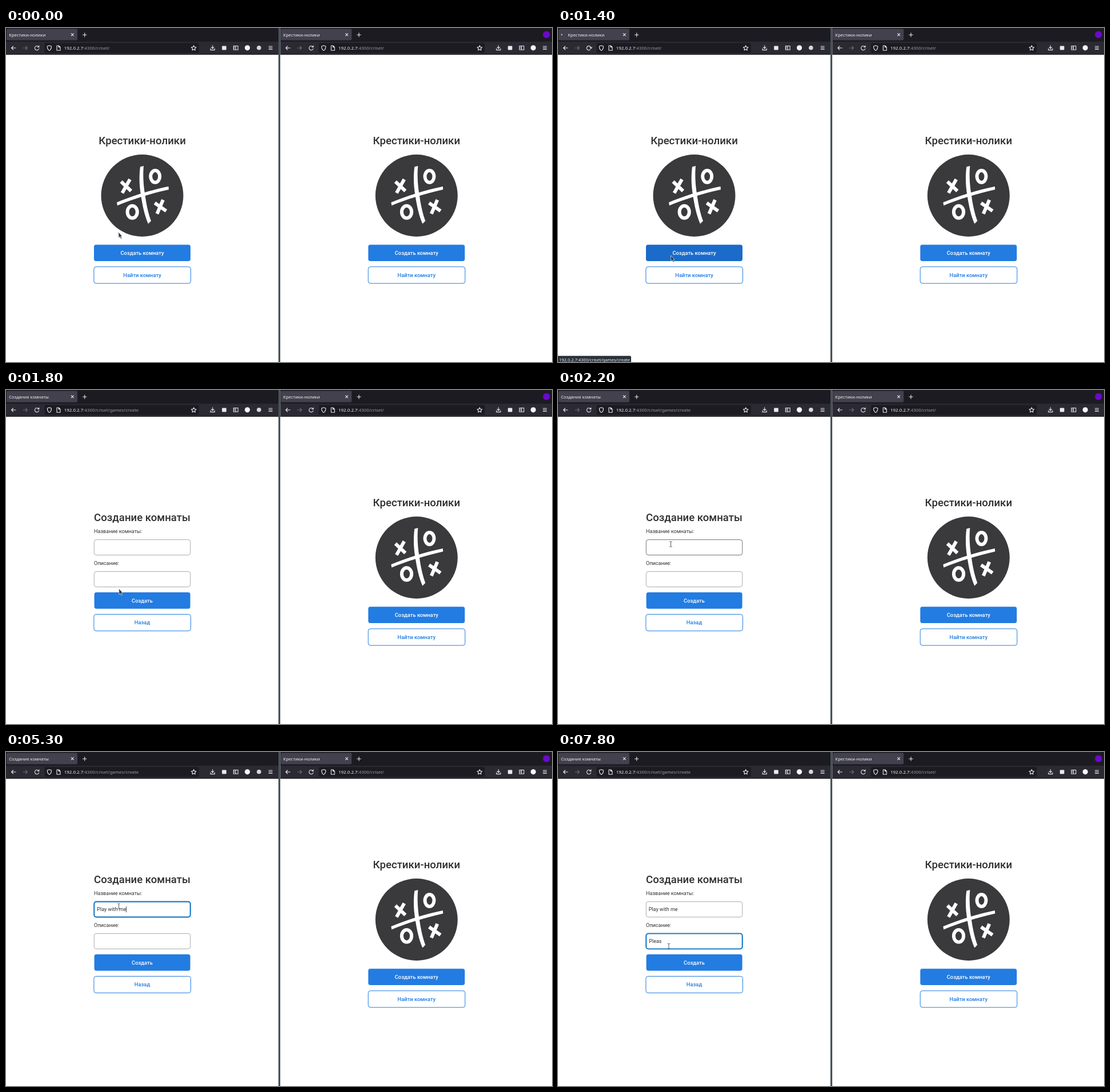
Write an HTML page that moves like this. It is 956x586 px and loops after 8 s.

```html
<!DOCTYPE html>
<html lang="ru">
<head>
<meta charset="utf-8">
<title>Крестики-нолики</title>
<style>
html, body { margin: 0; width: 100%; height: 100%; overflow: hidden; background: #fff; }
svg { display: block; width: 100%; height: 100%; }
text { white-space: pre; }
.ui { font-family: "Noto Sans", sans-serif; font-size: 7.5px; fill: #f3f3f6; }
.url { font-size: 7.9px; }
.dim { fill: #9c9ba5; }
.icon { fill: none; stroke: #e9e9ee; stroke-width: 1.1; stroke-linecap: round; stroke-linejoin: round; }
.h1, .btn { font-family: Roboto, sans-serif; font-weight: 500; text-anchor: middle; }
.h1 { font-size: 18.6px; fill: #303030; }
.btn { font-size: 9.4px; }
.body { font-family: Roboto, sans-serif; font-size: 9.1px; fill: #303030; }
.value { font-size: 9px; }
</style>
</head>
<body>
<svg id="stage" viewBox="0 0 956 586"></svg>
<script>
const LOOP = 8000, STEP = 100;
const BLUE = '#237ce1', BLUE_HOVER = '#1a6bca';
const HOST = '192.0.2.7', ROOT = ':4300/criset/', FORM = ROOT + 'games/create';

const rect = (x, y, w, h, r, attrs) =>
  `<rect x="${x}" y="${y}" width="${w}" height="${h}" rx="${r}" ${attrs}/>`;
const text = (x, y, cls, s, attrs = '') => `<text x="${x}" y="${y}" class="${cls}" ${attrs}>${s}</text>`;
const icon = (d, attrs = '') => `<path class="icon" d="${d}" ${attrs}/>`;
const move = (x, body) => `<g transform="translate(${x} 0)">${body}</g>`;

const solidButton = (id, x, y, w, label) =>
  rect(x, y, w, 28.7, 3.6, `id="${id}" fill="${BLUE}"`) +
  text(238.5, y + 17.5, 'btn', label, 'fill="#fff"');
const lineButton = (id, y, label) =>
  rect(153.9, y, 169.6, 29.2, 4, `id="${id}" fill="#fff" stroke="${BLUE}"`) +
  text(238.5, y + 17.9, 'btn', label, `fill="${BLUE}"`);

const board = `
  <circle cx="238.5" cy="294" r="72" fill="#3a393b"/>
  <g fill="#fff">
    <path d="M235 243.5L241 242C239.5 259 240.5 276 243.5 293C246 312 250 328 254 338.5L249 343.5C243 330 239 312 236.5 295C233 276 233 258 235 243.5Z"/>
    <path d="M194 306C220 295 255 284 284.5 278L285 283.5C255 290 220 301 195 311.5Z"/>
  </g>
  <g fill="none" stroke="#fff" stroke-width="6">
    <path d="M201.5 269.5L219 286M217 265.5L203.5 289.5M260.5 307L280.5 321M275 301.5L264.5 326"/>
    <ellipse cx="261.2" cy="260.5" rx="8" ry="10.4"/>
    <ellipse cx="221.2" cy="322.8" rx="8.6" ry="10.8"/>
  </g>`;

const home = id =>
  text(238.5, 204.3, 'h1', 'Крестики-нолики') + board +
  solidButton(id + 'Make', 154, 380.2, 169, 'Создать комнату') +
  lineButton(id + 'Find', 418.9, 'Найти комнату');

const field = (id, y) =>
  rect(154.3, y, 168.5, 27, 4, `id="${id}" fill="#fff"`) +
  text(158.7, y + 16.7, 'body value', '', `id="${id}Text"`) +
  rect(0, y + 8.3, 0.8, 10.5, 0, `id="${id}Caret" fill="#222"`);

const form =
  text(238.5, 229.8, 'h1', 'Создание комнаты') +
  text(154, 251.2, 'body', 'Название комнаты:') + field('name', 262.6) +
  text(154, 307.1, 'body', 'Описание:') + field('note', 318.5) +
  solidButton('send', 154.6, 355, 168, 'Создать') +
  lineButton('back', 393.5, 'Назад');

// Browser chrome; the toolbar buttons end at the window edge.
const chrome = (id, end, extra) => {
  const at = n => end - 20.3 * n;
  const x = at(extra ? 5 : 4), starX = x - 33;
  const badge = extra ? at(2) : at(1);
  return rect(0, 0, 478, 24, 0, 'fill="#1c1b22"') +
    rect(0, 24, 478, 22.5, 0, 'fill="#2b2a33"') +
    rect(0, 46, 478, 0.8, 0, 'fill="#0c0c0d"') +
    rect(1, 1.5, 124, 20, 2.2, 'fill="#42414d"') +
    (extra ? rect(1, 1.5, 124, 20, 2.2, 'id="burst" fill="url(#glow)"') +
      '<circle id="dot" cx="6.6" cy="11.8" r="1.2" fill="#c9c8d0"/>' : '') +
    text(5.3, 14.6, 'ui', 'Крестики-нолики', `id="${id}Tab"`) +
    icon('M114.3 9.6l4 4m0-4l-4 4', 'stroke-width=".8"') +
    icon('M134.5 12h6.4m-3.2-3.2v6.4') +
    icon('M17 35h-7.4m3-3l-3 3l3 3') +
    icon('M30 35h7.4m-3-3l3 3l-3 3', 'style="stroke:#6c6b75"') +
    icon('M57.1 33A3.7 3.7 0 1 0 57.7 36M57.8 31v2.5h-2.6', `id="${id}Reload"`) +
    rect(67.5, 26.2, starX + 9 - 67.5, 17.6, 2.2, 'fill="#1c1b22"') +
    icon('M75.9 30.7l3.6 1.2c.1 4-.8 6-3.6 7.7c-2.8-1.7-3.7-3.7-3.6-7.7z') +
    icon('M89 31h3.4l2.6 2.6v5.7h-6zM92.2 31v2.8h2.7', 'stroke-width=".9"') +
    `<text x="101.8" y="37.8" class="ui url">${HOST}<tspan class="dim" id="${id}Path">${ROOT}</tspan></text>` +
    icon('M0-4.3l1.3 2.8 3 .4-2.2 2.1.5 3-2.6-1.5-2.6 1.5.5-3-2.2-2.1 3-.4z', `transform="translate(${starX} 35)"`) +
    icon(`M${x} 30.8v5m-2.2-2l2.2 2.2l2.2-2.2m-5.8 2.2v2.6h7.2v-2.6`) +
    rect(x + 16.5, 31.4, 7.6, 7.2, 1, 'fill="#e9e9ee"') +
    icon(`M${x + 36.7} 31.5h7.8v6.8h-7.8zm3.6 0v6.8m-2.2-4.8h.6m-.6 2h.6`) +
    `<circle cx="${badge}" cy="34.8" r="4.6" fill="#f7f7fa"/>` +
    (extra ? `<circle cx="${at(1)}" cy="34.8" r="3.8" fill="#d8d8dd"/>` : '') +
    icon(`M${end - 3} 32.2h6m-6 2.6h6m-6 2.6h6`);
};

const pointers = `
  <path id="arrow" d="M0 0L.4 10.3L2.7 8.3L4.3 11.9L6 11.1L4.5 7.7L6.6 7.2Z" fill="#393b3e" stroke="#fff" stroke-width=".6"/>
  <path id="hand" d="M-3.2 .2C-2.6-.7-1.7-.3-1.1 .5L1.1 3L3 2.3L4.6 3L5.8 4.2C6.7 6 6.6 8 5.8 9.3L5.6 10.8H.6L-.2 9.4L-3.9 7.5C-4.5 6.8-4 6-3.1 6.2L-1.2 6.5L-3.1 1.7Z" fill="#393b3e" stroke="#fff" stroke-width=".5"/>
  <path id="beam" d="M-2.2-4.7Q0-4.7 0-3.8Q0-4.7 2.2-4.7M0-3.8V3.8M-2.2 4.7Q0 4.7 0 3.8Q0 4.7 2.2 4.7" fill="none" stroke="#444" stroke-width=".9"/>`;

document.getElementById('stage').innerHTML = `
  <defs><linearGradient id="glow">
    <stop offset="0" stop-color="#30588f"/><stop offset=".2" stop-color="#30588f"/>
    <stop offset=".28" stop-color="#30588f" stop-opacity="0"/>
  </linearGradient></defs>
  <rect width="956" height="586" fill="#fff"/>
  <g id="homePage">${home('a')}</g>
  <g id="formPage">${form}</g>
  ${chrome('a', 463.2, true)}
  <g id="status">${rect(-3, 575.2, 131, 14, 2, 'fill="#29323a"')}${text(2, 585, 'ui', HOST + FORM)}</g>
  ${move(480.3, home('b') + chrome('b', 463.2, false))}
  <circle cx="946.3" cy="11.6" r="6.2" fill="#6a0bc6"/>
  ${rect(477, 0, 3.2, 586, 0, 'fill="#465058"')}
  <g id="cursor">${pointers}</g>`;

const $ = {};
document.querySelectorAll('[id]').forEach(el => $[el.id] = el);
const show = (el, on) => el.style.display = on ? '' : 'none';
const set = (el, name, value) => el.setAttribute(name, value);

// Pairs of time and number of letters typed.
const NAME = 'Play with me', NOTE = 'Pleas';
const NAME_KEYS = [[3200, 1], [3300, 2], [3500, 3], [3600, 4], [3800, 5], [4100, 6], [4400, 7], [4800, 9], [4900, 10], [5300, 12]];
const NOTE_KEYS = [[7100, 1], [7400, 3], [7700, 4], [7800, 5]];
const typed = (s, keys, t) => s.slice(0, keys.reduce((n, [at, count]) => t >= at ? count : n, 0));

const ease = (t, from, to) => {
  const p = Math.min(1, Math.max(0, (t - from) / (to - from)));
  return p * p * (3 - 2 * p);
};

function pointerAt(t) {
  if (t < 1500) return [196.8 + 0.6 * ease(t, 300, 1200), 358 + 41 * ease(t, 300, 1200)];
  if (t < 6100) return [197.6, 399 - 128.5 * ease(t, 1500, 2200)];
  return t < 6300 ? [197.4, 290.6] : [194, 340.8];
}

function paintField(id, value, focus, hover, caret) {
  const x = focus ? 159.3 : 158.7, label = $[id + 'Text'];
  set($[id], 'stroke', focus ? '#1f7cc6' : hover ? '#62626c' : '#a2a2a9');
  set($[id], 'stroke-width', focus ? 2.2 : 0.9);
  set(label, 'x', x);
  label.textContent = value;
  show($[id + 'Caret'], caret);
  if (caret) set($[id + 'Caret'], 'x', x + (value ? label.getComputedTextLength() : 0));
}

function draw(time) {
  const t = Math.floor(time / STEP) * STEP;
  const onForm = t >= 1500, loading = t === 1400;
  const [x, y] = pointerAt(t);
  const over = (top, bottom) => y >= top && y <= bottom;

  show($.homePage, !onForm);
  show($.formPage, onForm);
  const overMake = !onForm && over(380, 409);
  const overSend = onForm && over(355, 384);
  const overBack = onForm && over(393, 423);
  const overName = onForm && over(262, 290);
  const overNote = onForm && over(318, 346);

  set($.aMake, 'fill', overMake ? BLUE_HOVER : BLUE);
  set($.send, 'fill', overSend ? BLUE_HOVER : BLUE);
  set($.back, 'fill', overBack ? '#f8f9fa' : '#fff');
  show($.status, overMake);

  $.aTab.textContent = onForm ? 'Создание комнаты' : 'Крестики-нолики';
  set($.aTab, 'x', loading ? 17.4 : 5.3);
  $.aPath.textContent = onForm ? FORM : ROOT;
  set($.aReload, 'transform', loading ? 'rotate(35 54 35)' : '');
  show($.dot, loading);
  show($.burst, t === 1500);

  paintField('name', typed(NAME, NAME_KEYS, t), t >= 2800 && t < 6500, overName, t >= 2800 && t < 6100);
  paintField('note', typed(NOTE, NOTE_KEYS, t), t >= 6500, overNote, t >= 6500 && t < 7800);

  const kind = overName || overNote ? 'beam'
    : (overMake && !loading) || overSend || overBack ? 'hand' : 'arrow';
  for (const k of ['arrow', 'hand', 'beam']) show($[k], k === kind);
  set($.cursor, 'transform', `translate(${x} ${y})`);
}

const start = performance.now();
function tick() {
  draw((performance.now() - start) % LOOP);
  requestAnimationFrame(tick);
}
tick();
</script>
</body>
</html>
```
